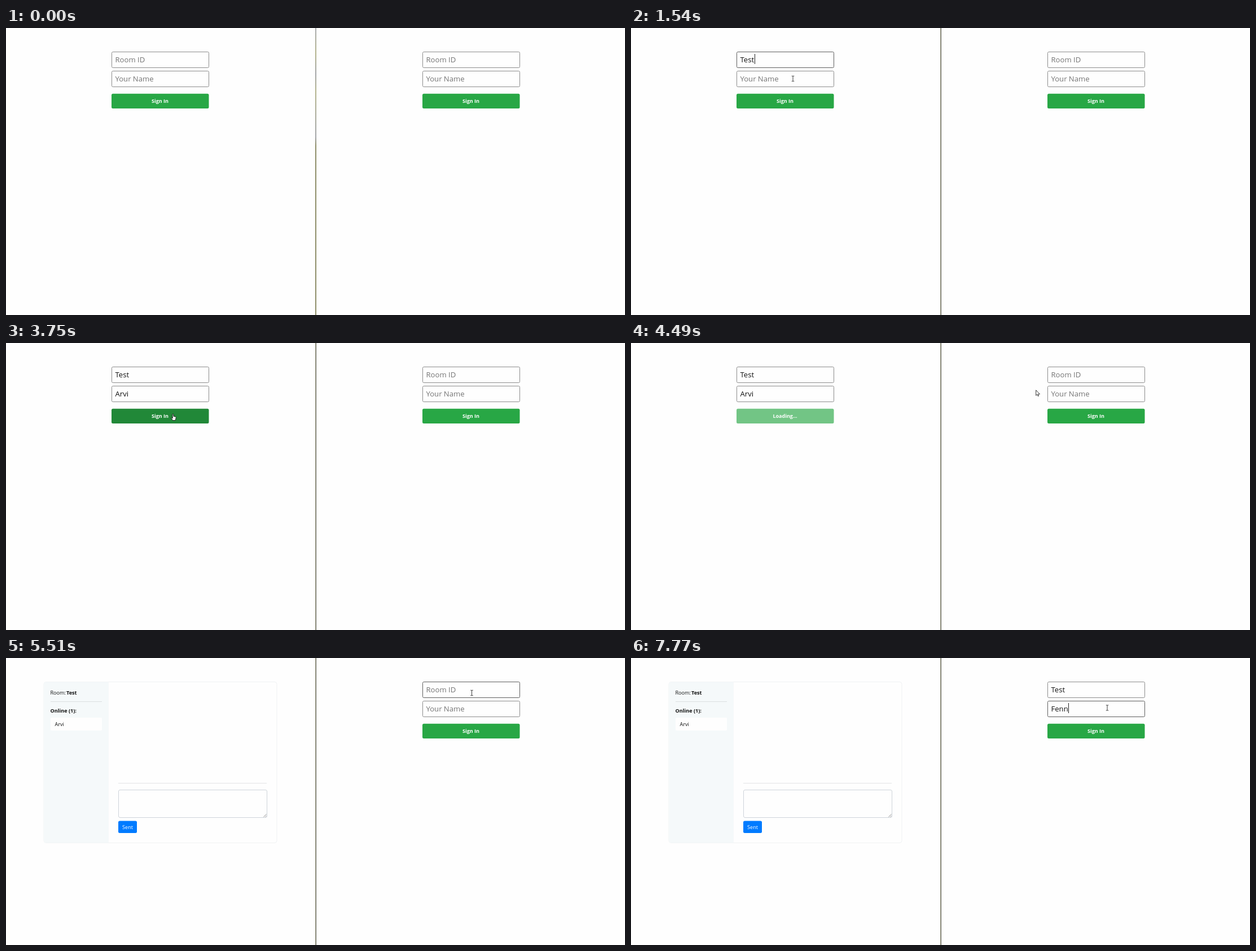
Write an HTML page that moves like this. It is 1097 by 510 pixels and loops after 8 s.

```html
<!DOCTYPE html>
<html lang="en">
<head>
<meta charset="utf-8">
<title>Chat sign in</title>
<style>
  html, body { margin: 0; width: 100%; height: 100%; overflow: hidden; background: #fefefe; }
  svg { display: block; width: 1097px; height: 510px; font: 9.1px "Open Sans", "Noto Sans", sans-serif; fill: #111; }
  .field rect { fill: #fefefe; stroke: #8b8b8b; }
  .field.focus rect { stroke: #5c5c5c; }
  .field text { font-size: 13.1px; fill: #111; }
  .field.empty text { fill: #757575; }
  .caret { fill: #222; }
  .button text { font-size: 9px; font-weight: 700; fill: #fff; text-anchor: middle; }
  .bold { font-weight: 700; }
  .line { fill: none; stroke: #e2e4e6; }
</style>
</head>
<body>
<svg id="stage" viewBox="0 0 1097 510">
  <defs>
    <linearGradient id="seam" x1="0" y1="0" x2="0" y2="1">
      <stop offset="0" stop-color="#a9abb0"/>
      <stop offset=".09" stop-color="#b4b48c"/>
      <stop offset=".16" stop-color="#a4a6aa"/>
      <stop offset=".22" stop-color="#b4b48c"/>
      <stop offset=".38" stop-color="#a4a6aa"/>
      <stop offset=".41" stop-color="#8f8f69"/>
      <stop offset="1" stop-color="#8f8f69"/>
    </linearGradient>
  </defs>

  <g id="chat">
    <rect class="line" x="67" y="42.5" width="413" height="286" rx="4" style="stroke:#f0f2f3"/>
    <path d="M182 42.5H71a4 4 0 0 0-4 4v278a4 4 0 0 0 4 4h111z" fill="#f5f9fa"/>
    <text x="78.5" y="64.6">Room:</text>
    <text class="bold" x="107" y="64.6">Test</text>
    <path class="line" d="M79 77.5h91" style="stroke:#dbdfe1"/>
    <text class="bold" x="78.5" y="97.2">Online (1):</text>
    <rect x="79" y="106" width="91" height="23" rx="2" fill="#fefefe"/>
    <text x="86.5" y="121.3">Arvi</text>
    <path class="line" d="M199 222.5h263"/>
    <rect class="line" x="199.5" y="234.5" width="263" height="49" rx="2.5" style="stroke:#ced4da"/>
    <path d="M456.5 282.5l5-5M459.5 282.5l2-2" stroke="#777" stroke-width=".8"/>
    <rect x="199" y="289.5" width="33" height="21.5" rx="2.5" fill="#007bff"/>
    <text x="215.5" y="303.7" text-anchor="middle" style="fill:#fff">Sent</text>
  </g>

  <g id="forms"></g>

  <rect id="wideSeam" x="548" y="0" width="2" height="510" fill="url(#seam)"/>
  <g id="thinSeam">
    <rect x="548" width="1" height="510" fill="#a6a691"/>
    <rect x="549" width="1" height="510" fill="#65655a"/>
  </g>

  <g id="cursor" stroke-linejoin="round" stroke-linecap="round">
    <path id="arrow" d="M.5.3V9.4L2.6 7.5l1.5 3.2 1.4-.6L4.1 7h2.8z" fill="#fff" stroke="#222" stroke-width=".9"/>
    <path id="beam" d="M-1.8-4.7H-.5L0-4.2.5-4.7H1.8M0-4.2V4.2M-1.8 4.7H-.5L0 4.2.5 4.7H1.8" fill="none" stroke="#333" stroke-width=".95"/>
    <path id="hand" d="M-.9.6q.9-1.1 1.8 0v3.6l3.5.8q1 .3.9 1.4L4.7 9.3l-.8 2.2H-.4L-3 7.8q-.6-1.3.8-1.1L-.9 7.7z" fill="#fff" stroke="#111" stroke-width=".9"/>
  </g>
</svg>

<script>
const LOOP = 8000, BLINK = 530;
const byId = id => document.getElementById(id);
const show = (node, visible) => node.style.display = visible ? '' : 'none';

function add(parent, tag, attrs) {
  const node = document.createElementNS('http://www.w3.org/2000/svg', tag);
  for (const key in attrs) node.setAttribute(key, attrs[key]);
  return parent.appendChild(node);
}

function makeField(parent, x, y, hint) {
  const group = add(parent, 'g', { class: 'field' });
  add(group, 'rect', { x: x + .5, y: y + .5, width: 172, height: 28, rx: 2 });
  const text = add(group, 'text', { x: x + 6.5, y: y + 18.8 });
  const caret = add(group, 'rect', { class: 'caret', x, y: y + 4, width: 1, height: 18 });
  caret.style.cssText = 'stroke:none;fill:#222';
  return (value, focused, caretOn) => {
    group.setAttribute('class', `field ${value ? '' : 'empty'} ${focused ? 'focus' : ''}`);
    text.textContent = value || hint;
    caret.setAttribute('x', x + 7 + Math.round(value ? text.getComputedTextLength() : 0));
    show(caret, focused && caretOn);
  };
}

function makeForm(x) {
  const group = add(byId('forms'), 'g', {});
  const room = makeField(group, x, 42, 'Room ID');
  const name = makeField(group, x, 76, 'Your Name');
  const button = add(group, 'g', { class: 'button' });
  const face = add(button, 'rect', { x, y: 116.7, width: 172.5, height: 26.3, rx: 2.5 });
  const label = add(button, 'text', { x: x + 86, y: 133.3 });
  return { x, group, room, name, button, face, label };
}

const left = { ...makeForm(187), focusRoom: 980, paste: 1170, focusName: 1690, blur: 3740,
  word: 'Arvi', keys: [2080, 2715, 2820, 3040], hover: 3620, submit: 4060, enter: 4680 };
const right = { ...makeForm(738), focusRoom: 4975, paste: 5560, focusName: 5970, blur: Infinity,
  word: 'Fenn', keys: [6900, 7210, 7590, 7770], hover: Infinity, submit: Infinity, enter: Infinity };

function drawForm(form, t) {
  const typed = form.keys.filter(k => t >= k).length;
  const lastInput = Math.max(...[form.focusRoom, form.paste, form.focusName, ...form.keys].filter(k => k <= t), 0);
  const caretOn = Math.floor((t - lastInput) / BLINK) % 2 === 0;
  const loading = t >= form.submit;
  form.room(t >= form.paste ? 'Test' : '', t >= form.focusRoom && t < form.focusName, caretOn);
  form.name(form.word.slice(0, typed), t >= form.focusName && t < form.blur, caretOn);

  const dark = loading ? 0 : Math.min(1, Math.max(0, (t - form.hover) / 120));
  const mix = (a, b) => Math.round(a + (b - a) * dark);
  form.face.setAttribute('fill', `rgb(${mix(40, 33)},${mix(167, 136)},${mix(69, 56)})`);
  form.button.setAttribute('opacity', loading ? .65 : 1);
  form.label.textContent = loading ? 'Loading...' : 'Sign In';
  show(form.group, t < form.enter);
}

const smooth = p => p * p * (3 - 2 * p);
const slowDown = p => p * (2 - p);
const moves = [
  { from: 340, to: 490, x: 119, y: -9, ease: smooth },
  { from: 490, to: 940, x: 252, y: 55, ease: slowDown },
  { from: 1190, to: 1530, x: 287, y: 90, ease: smooth },
  { from: 3530, to: 3740, x: 296, y: 126, ease: smooth },
  { from: 4060, to: 4490, x: 716.5, y: 84, ease: p => p },
  { from: 4490, to: 4800, x: 825.5, y: 62, ease: slowDown },
  { from: 5560, to: 5940, x: 844, y: 88.5, ease: smooth },
];

function pointerAt(t) {
  let x = 118, y = -14;
  for (const move of moves) {
    if (t < move.from) break;
    const p = move.ease(Math.min(1, (t - move.from) / (move.to - move.from)));
    x += (move.x - x) * p;
    y += (move.y - y) * p;
  }
  return { x, y };
}

function drawPointer(t) {
  const { x, y } = pointerAt(t);
  const form = [left, right].find(f => x >= f.x && x <= f.x + 173 && t < f.enter);
  const onField = form && (y >= 42 && y <= 71 || y >= 76 && y <= 105);
  const onButton = form && y >= 117 && y <= 143 && t < form.submit;
  const shape = onField ? 'beam' : onButton ? 'hand' : 'arrow';
  for (const id of ['arrow', 'beam', 'hand']) show(byId(id), id === shape);
  byId('cursor').setAttribute('transform', `translate(${x.toFixed(2)} ${y.toFixed(2)})`);
}

function draw(t) {
  drawForm(left, t);
  drawForm(right, t);
  show(byId('chat'), t >= left.enter);
  show(byId('wideSeam'), t < 490);
  show(byId('thinSeam'), t >= 490);
  drawPointer(t);
}

const start = performance.now();
function tick() {
  draw((performance.now() - start) % LOOP);
  requestAnimationFrame(tick);
}
tick();
</script>
</body>
</html>
```
